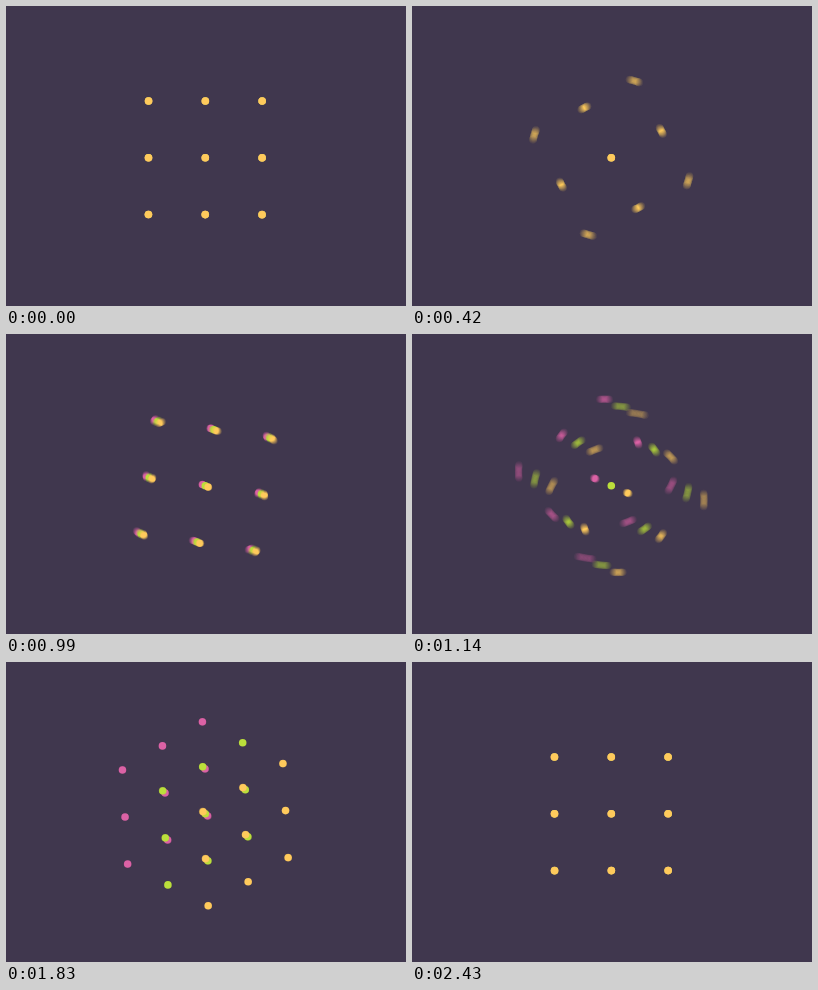
An HTML page with a canvas for the animation above (2730 ms loop, 400 px wide and 300 px high).

```html
<!DOCTYPE html>
<html lang="en">
<head>
<meta charset="utf-8">
<title>Turning lattice</title>
<style>
  html, body { margin: 0; width: 100%; height: 100%; overflow: hidden; background: #40374e; }
  canvas { display: block; }
</style>
</head>
<body>
<canvas id="stage" width="400" height="300"></canvas>
<script>
const WIDTH = 400, HEIGHT = 300;
const FRAME_MS = 30, FRAMES = 91;
const SHUTTER = 0.7, SAMPLES = 12;
const CENTER = { x: 199.3, y: 151.8 }, SPACING = 56.8, RADIUS = 3.8;
const BACKGROUND = "#40374e";
// Back to front, so the front layer hides the others when they line up.
const LAYERS = [
  { depth: -1, color: "#db62a5" },
  { depth: 0, color: "#bbdf3b" },
  { depth: 1, color: "#ffca5c" }
];
// Angles in degrees that look along the cube's body diagonal.
const TILT = { x: -22.35, y: 51.5, z: -28.1 };

const out = document.getElementById("stage").getContext("2d");
const buffer = document.createElement("canvas");
buffer.width = WIDTH;
buffer.height = HEIGHT;
const ctx = buffer.getContext("2d");

const radians = degrees => degrees * Math.PI / 180;

function ease(time, start, length) {
  const p = Math.min(1, Math.max(0, (time - start) / length));
  return p < 0.5 ? 4 * p ** 3 : 1 - 4 * (1 - p) ** 3;
}

function poseAt(time) {
  const spin = ease(time, -0.6, 22.6);
  const open = ease(time, 27.2, 25.6);
  const close = ease(time, 55.6, 27.6);
  const tilt = open - close;
  return {
    x: radians(TILT.x * tilt),
    y: radians(TILT.y * tilt),
    z: radians(180 * (spin + open) + TILT.z * tilt)
  };
}

function projector(pose) {
  const [cx, sx] = [Math.cos(pose.x), Math.sin(pose.x)];
  const [cy, sy] = [Math.cos(pose.y), Math.sin(pose.y)];
  const [cz, sz] = [Math.cos(pose.z), Math.sin(pose.z)];
  return (i, j, k) => {
    const x = i * cz - j * sz;
    const y = i * sz + j * cz;
    const z = y * sx + k * cx;
    return {
      x: CENTER.x + SPACING * (x * cy + z * sy),
      y: CENTER.y + SPACING * (y * cx - k * sx)
    };
  };
}

function drawLattice(time) {
  const project = projector(poseAt(time));
  ctx.fillStyle = BACKGROUND;
  ctx.fillRect(0, 0, WIDTH, HEIGHT);
  for (const { depth, color } of LAYERS) {
    ctx.fillStyle = color;
    for (let i = -1; i <= 1; i++) {
      for (let j = -1; j <= 1; j++) {
        const dot = project(i, j, depth);
        ctx.beginPath();
        ctx.arc(dot.x, dot.y, RADIUS, 0, 2 * Math.PI);
        ctx.fill();
      }
    }
  }
}

// Motion blur: a running average of moments while the shutter is open.
function drawFrame(frame) {
  for (let s = 0; s < SAMPLES; s++) {
    drawLattice(frame + SHUTTER * s / SAMPLES);
    out.globalAlpha = 1 / (s + 1);
    out.drawImage(buffer, 0, 0);
  }
}

let shown = -1;
function tick() {
  const frame = Math.floor(performance.now() / FRAME_MS) % FRAMES;
  if (frame !== shown) {
    drawFrame(frame);
    shown = frame;
  }
  requestAnimationFrame(tick);
}
tick();
</script>
</body>
</html>
```
